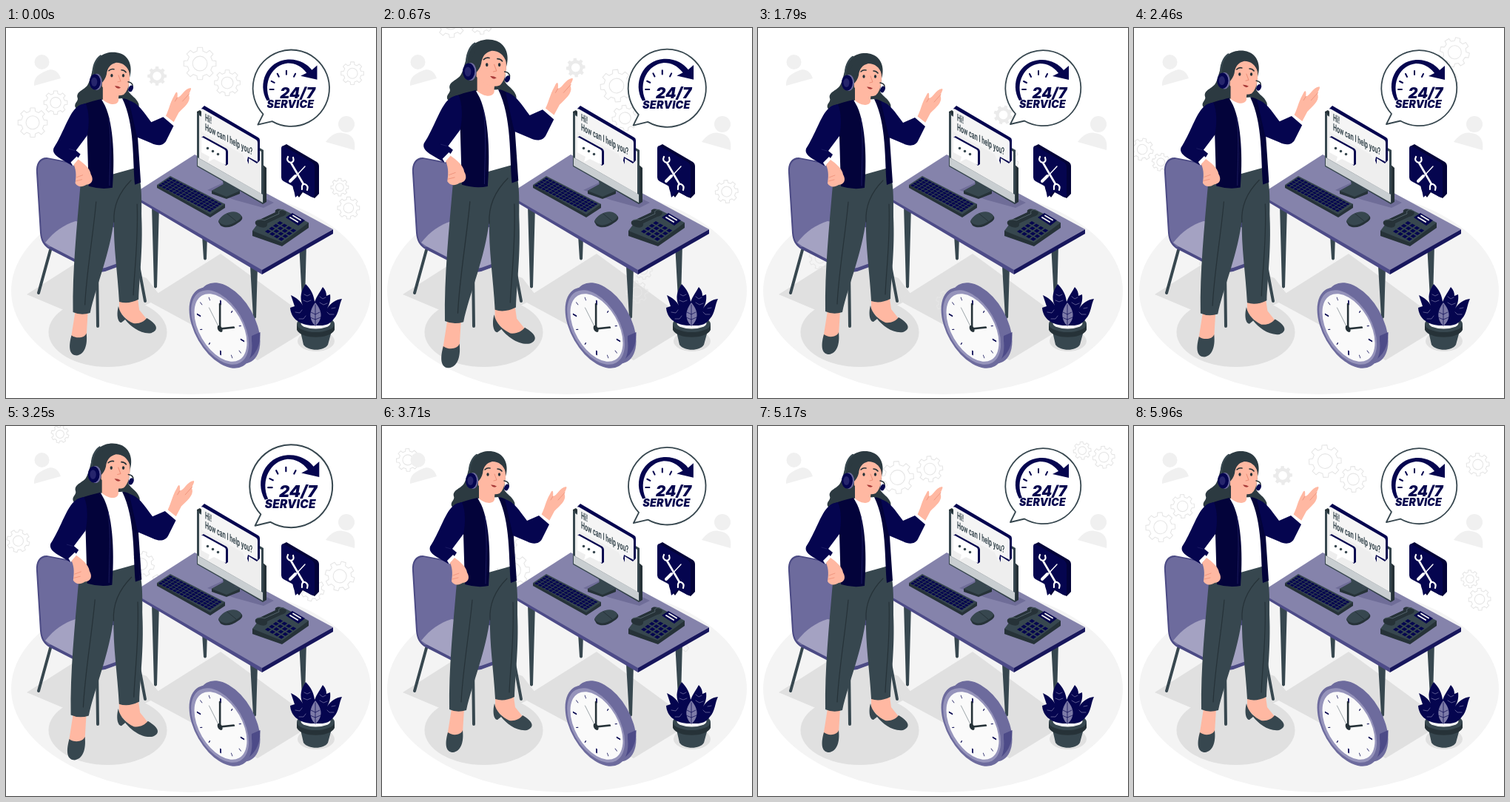
An HTML page for the animation above (6 s loop, 500 by 500 pixels).

```html
<!DOCTYPE html>
<html lang="en">
<head>
<meta charset="utf-8">
<title>24/7 service</title>
<style>
html, body { margin: 0; width: 100%; height: 100%; overflow: hidden; background: #fff; }
svg { display: block; width: 100vw; height: 100vh; }
.navy { fill: #05054f; }
.coat { fill: #03033a; }
.slate { fill: #37474f; }
.dark { fill: #263238; }
.hair { fill: #2c3a41; }
.purple { fill: #6d6b9d; }
.skin { fill: #ffb8a2; }
.white { fill: #fff; }
.line { fill: none; stroke-linecap: round; stroke-linejoin: round; }
</style>
</head>
<body>
<svg viewBox="0 0 500 500">
  <ellipse cx="250" cy="355" rx="243" ry="140" fill="#f4f4f4"/>
  <g fill="#e0e0e0">
    <path d="M28 360 L110 308 L190 338 L210 364 L130 403 Z"/>
    <path d="M190 368 L290 305 L420 400 L340 449 Z"/>
    <ellipse cx="137.500" cy="411" rx="80" ry="47"/>
    <ellipse cx="419" cy="423" rx="25" ry="14"/>
  </g>

  <g id="gears"></g>

  <g fill="#f0f0f0">
    <circle cx="48.500" cy="46" r="10"/>
    <path d="M38 78 C37 66 45 62 54 58 C64 53 71 59 74 68 Z"/>
    <circle cx="460" cy="130" r="11"/>
    <path d="M432 154 C438 146 446 140 455 142 C468 143 473 152 471 165 Z"/>
  </g>

  <g id="chair">
    <path class="line" stroke="#37474f" stroke-width="4" d="M60 300 L44 358 M123 325 L124 403 M176 305 L188 369"/>
    <path fill="#4b4a84" d="M41 196 C40 183 45 175 55 175 L92 182 C104 186 110 200 112 214 L178 292 C182 304 176 313 164 318 L134 329 C126 331 118 329 110 325 L57 298 C50 293 47 287 46 277 Z"/>
    <path class="purple" d="M43 196 C42 182 48 177 57 177 L92 184 C104 188 108 202 110 216 L120 280 L58 296 C52 291 49 287 48 277 Z"/>
    <path fill="#a4a2c2" d="M53 290 C65 275 78 266 94 261 L150 270 L172 292 C178 302 172 310 162 314 L134 324 C126 326 119 325 112 322 L60 295 Z"/>
  </g>

  <g id="desk">
    <path class="slate" d="M197 240 h10 l-3 110 q-2 3 -4 0 Z M265 280 h7 l-1 32 q-2 3 -4 0 Z M330 322 h10 l-2 69 q-2 3 -4 0 Z M396 292 h10 l-2 74 q-2 3 -4 0 Z"/>
    <path fill="#4d4b88" d="M181 224 L346 325 V333 L181 235 Z"/>
    <path fill="#17165c" d="M346 325 L442 272 V278 L346 333 Z"/>
    <path fill="#8583ab" d="M177 221 L255 171 L442 272 L346 327 L177 229 Z"/>
    <path fill="#6f6d98" d="M272 219 L300 206 L362 236 L348 243 L308 232 Z"/>
  </g>

  <g id="keyboard">
    <path class="dark" d="M204 212 V216 L276 256 L296 243 V238 Z"/>
    <path class="slate" d="M204 212 L222 200 L296 238 L276 252 Z"/>
    <g id="keys" class="navy"></g>
  </g>
  <g id="mouse">
    <path class="dark" d="M287 262 C289 256 302 246 312 250 C322 254 321 259 314 263 C305 270 296 271 290 267 Z"/>
    <path class="slate" d="M287 261 C290 253 303 246 312 249 C321 253 319 257 312 261 C303 267 296 268 290 264 Z"/>
    <path class="line" stroke="#263238" d="M299 251 L311 261"/>
  </g>

  <g id="monitor">
    <path class="dark" d="M278 220 L296 210 L316 220 V224 L298 231 L278 224 Z"/>
    <path class="slate" d="M278 220 L296 210 L316 220 L298 228 Z M292 202 L309 211 V220 C306 224 299 222 295 217 Z"/>
    <path class="dark" d="M258 113 L262 111 L352 189 L352 235 L347 238 L258 186 Z"/>
    <path class="slate" d="M258 114 L348 165 V238 L258 187 Z"/>
    <path fill="#c9ced1" d="M259 175 L347 225 V236 L259 186 Z"/>
    <path fill="#eeeeee" d="M261 118 L345 167 V224 L261 176 Z"/>
  </g>
  <g id="chat">
    <path class="navy" d="M264 109 L268 105 L341 148 Q343 149 343 152 V179 L339 183 L328 176 V184 L323 172 Z"/>
    <path fill="#f5f5f5" d="M264 111 Q264 108 267 110 L338 151 Q340 152 340 155 V181 L327 174 L325 184 L320 171 L264 140 Z"/>
    <g class="slate" font-family="Roboto, 'Open Sans', sans-serif" font-weight="700" font-size="13.500">
      <text transform="matrix(.53 .28 0 1 269 125)">Hi!</text>
      <text transform="matrix(.53 .28 0 1 269 138)">How can I help you?</text>
    </g>
    <path class="navy" d="M264 148 L267 146 L298 163 Q300 165 300 167 V184 L297 186 Z"/>
    <path class="white" d="M264 149 Q264 147 266 148 L295 164 Q297 165 297 167 V185 L281 177 L273 181 L275 174 L264 168 Z"/>
    <path class="line" stroke="#37474f" stroke-width="3.600" d="M272.500 162.500 h.01 M279.500 166.500 h.01 M286.500 170.500 h.01"/>
  </g>

  <g id="phone">
    <path class="dark" d="M333 274 V281 L373 295 L409 270 V263 Z"/>
    <path class="slate" d="M333 274 L345 258 L374 245 L409 263 L373 290 Z"/>
    <g id="buttons" class="navy"></g>
    <path class="dark" d="M341 268 C335 266 335 259 343 259 L364 249 C362 244 371 243 377 247 C381 250 378 254 372 255 L353 264 C354 270 348 271 341 268 Z"/>
    <path class="line" stroke="#53636b" d="M339 260 C343 258 347 259 349 260 L369 251 C367 246 373 244 377 247"/>
    <path class="navy" d="M378 256 L387 250 L404 260 L395 267 Z"/>
    <path class="line" stroke="#eeeeee" stroke-width="2" d="M384 256 l10 6 M388 253.500 l10 6"/>
  </g>

  <g id="tools">
    <path fill="#030338" d="M373 160 L379 157 L420 181 Q423 183 423 187 V224 L417 230 L401 222 L396 229 L389 220 Z"/>
    <path class="navy" d="M372 163 Q372 158 376 160 L413 181 Q417 184 417 188 V226 Q416 230 412 228 L400 221 L391 229 L388 214 L375 207 Q372 205 372 202 Z"/>
    <g class="line" stroke="#fff">
      <path stroke-width="2.600" d="M385 182 L402 211"/>
      <path stroke-width="2.200" d="M381 174 q-3 6 4 8 q5 -1 3 -7 M400 218 q-1 -8 4 -7 q5 2 3 8"/>
      <path stroke-width="1.400" d="M404 187 L391 201"/>
      <path stroke-width="4" d="M391 200 L384 207"/>
    </g>
  </g>

  <g id="clock">
    <g transform="matrix(.866 .5 0 1 301 399)"><circle r="49" class="purple"/></g>
    <path class="purple" d="M266 357 L277 349 L334 436 L313 457 Z"/>
    <path fill="#4d4b88" d="M332 416 L343.500 411 C344 434 334 447 314 456 C327 448 332 435 332 416 Z"/>
    <g transform="matrix(.866 .5 0 1 290 405)">
      <circle r="49" class="purple"/>
      <circle r="45" cx="-1" fill="#9694bb"/>
      <circle r="41" fill="#fafafa"/>
      <g id="ticks" stroke="#05054f"></g>
      <path class="line" stroke="#8a949a" stroke-width=".8" d="M0 4 L-18 -18"/>
      <path class="line" stroke="#263238" stroke-width="3" d="M-1 2 L-1 -31"/>
      <path class="line" stroke="#263238" stroke-width="2.400" d="M-1 2 L21 -11"/>
      <circle cx="-1" cy="2" r="4" class="dark"/>
    </g>
  </g>

  <g id="plant">
    <path class="slate" d="M397 406 L402 428 C408 437 430 437 435 428 L441 406 Z"/>
    <path class="dark" d="M393 400 V408 C399 421 438 421 444 408 V400 Z"/>
    <ellipse cx="418.500" cy="400" rx="25.500" ry="11" class="slate"/>
    <ellipse cx="418.500" cy="399" rx="20" ry="7.500" fill="#f5f5f5"/>
    <path class="navy" d="M412 402 C394 400 385 391 384 378 L390 376 L385 361 C393 365 398 369 401 375 C396 364 399 355 405 346 C412 353 416 361 417 370 C420 362 425 356 428 350 C432 354 433 358 433 362 L438 360 C439 368 437 374 434 379 C439 371 446 367 454 366 C450 374 450 386 443 393 C438 400 432 402 425 402 Z"/>
    <path fill="#7d7ba8" d="M418 403 C408 392 410 382 418 371 C427 382 429 392 418 403 Z"/>
    <path class="line" stroke="#6d6b9d" stroke-width=".8" d="M403 360 l4 2 4 -2 M402 368 l5 2 5 -2 M391 384 l6 1 3 -4 M396 393 l6 0 3 -4 M424 363 l4 3 4 -2 M424 371 l5 3 5 -2 M445 378 l-5 1 M443 387 l-6 0 -3 -3"/>
    <path class="line" stroke="#05054f" stroke-width=".7" d="M418 374 V402 M412 384 l6 3 6 -3 M411 391 l7 3 7 -3"/>
  </g>

  <g id="bubble">
    <path d="M348 116 A51 51 0 1 1 360 125.500 L341 130 Z" fill="#fff" stroke="#37474f" stroke-width="1.800" stroke-linejoin="round"/>
    <path class="navy" d="M353 98 C340 75 353 45 381 43 C395 42 407 49 413 57 L420 51 L420 70 L398 65 L406 61 C399 52 391 48 381 48 C360 50 347 74 357 97 Z"/>
    <path class="line" stroke="#05054f" stroke-width="2" d="M357 83 h5 M359 72 l4 2 M367 62 l2 4 M379 58 v5 M391 62 l-2 4"/>
    <g class="navy" font-family="Inter, 'Open Sans', sans-serif" font-weight="900" font-style="italic">
      <text x="370.500" y="94.500" font-size="20">24/7</text>
      <text x="353" y="108" font-size="14" letter-spacing=".2">SERVICE</text>
    </g>
  </g>

  <g id="woman">
    <path class="hair" d="M118 56 C120 38 140 30 155 36 C168 41 171 56 167 68 L165 86 C170 94 175 94 179 103 C182 112 172 116 163 111 L120 108 C110 115 98 115 94 108 C92 102 99 100 97 95 C95 87 105 85 110 79 C114 73 115 65 118 56 Z"/>
    <g id="feet">
      <path class="skin" d="M94 382 H111 L109 415 L100 424 L88 420 Z M153 366 H178 L180 380 L192 395 L182 402 L166 396 L153 382 Z"/>
      <path class="slate" d="M89 414 C84 432 87 441 96 441 C106 440 111 428 109 411 C107 418 95 419 89 414 Z M152 375 C149 386 151 397 156 397 L161 393 C168 402 182 413 196 411 C207 407 204 399 190 391 C186 396 180 399 172 398 C163 394 154 386 152 375 Z"/>
    </g>
    <path class="slate" d="M108 208 L176 189 C184 206 183 232 183 255 C185 300 180 335 179 366 Q165 373 153 369 C151 330 145 295 146 258 C141 304 121 350 114 384 Q102 388 91 383 C90 328 96 270 101 212 Z"/>
    <path class="line" stroke="#263238" stroke-width="1.200" d="M146 262 C145 245 150 225 169 206 M107 373 C109 330 118 280 122 235 M172 360 C173 330 179 286 177 238"/>
    <path class="white" d="M128 98 L158 96 C169 108 172 125 173 145 L171 189 C163 193 152 193 143 190 L140 125 Z"/>
    <path class="skin" d="M131 78 L153 86 L152 96 C154 104 143 108 131 98 Z"/>
    <g id="rightArm">
      <path class="skin" d="M213 124 C220 113 220 104 227 92 C230 85 232 87 231 95 C237 94 240 83 249 82 C251 84 245 90 247 93 C249 101 240 108 233 115 L225 130 Z"/>
      <path class="line" stroke="#ec8f78" stroke-width=".8" d="M247 90 L238 100 M231 95 l-3 5"/>
      <path class="white" d="M211 122 L215 119 L229 130 L225 135 Z"/>
      <path class="coat" d="M157 96 C167 97 173 102 177 112 L178 150 L182 209 L174 212 C171 180 174 130 157 96 Z"/>
      <path class="navy" d="M166 99 C178 102 184 112 196 128 L212 121 L226 133 L216 153 C212 160 204 160 196 156 L177 148 Z"/>
    </g>
    <path class="coat" d="M129 97 C117 100 109 102 102 105 L110 146 L112 214 Q129 219 144 216 C147 180 146 132 134 106 Z"/>
    <path class="navy" d="M108 103 C101 104 98 106 95 109 C85 118 77 145 65 163 C63 169 68 173 74 177 L91 187 L101 171 L95 166 L110 146 C113 132 113 114 108 103 Z"/>
    <path class="line" stroke="#26256c" stroke-width=".7" d="M139 122 C143 150 140 190 140 213 M93 166 l-7 -2"/>
    <path class="white" d="M88 182 L96 174 L99 177 L91 187 Z"/>
    <path class="skin" d="M92 185 L98 178 C105 183 114 190 115 198 C119 205 117 211 109 212 C103 216 97 215 94 210 C95 202 96 194 92 185 Z"/>
    <path class="line" stroke="#ec8f78" stroke-width=".8" d="M96 202 l8 -3 M95 207 l8 -2"/>
    <g id="head">
      <path class="skin" d="M130 66 C130 44 155 42 165 53 C169 67 167 84 159 91 C149 95 136 88 130 80 Z"/>
      <path class="hair" d="M125 74 C121 50 134 37 149 37 C161 37 169 46 167 62 C164 53 158 48 149 48 C141 50 137 55 136 64 C135 69 132 73 129 76 Z"/>
      <path class="line" stroke="#263238" stroke-width="1.600" d="M139 59 q3 -3 7 -2 M156 58 q4 0 6 3"/>
      <ellipse cx="143" cy="65.500" rx="1.600" ry="2.200" class="dark"/>
      <ellipse cx="158.500" cy="65.500" rx="1.600" ry="2.200" class="dark"/>
      <path class="line" stroke="#ec8f78" d="M152 65 l3 8 -4 1"/>
      <path fill="#a83b39" d="M147 79.500 Q151 79 155 81.500 Q151 85 147 79.500 Z"/>
      <path class="line" stroke="#37474f" stroke-width="2.400" d="M118 66 C117 53 122 43 128 39"/>
      <ellipse cx="123" cy="74" rx="7" ry="11" fill="#6d6b9d"/>
      <ellipse cx="120.500" cy="74" rx="7.500" ry="10.500" class="navy"/>
      <ellipse cx="119.500" cy="74" rx="4" ry="6" fill="#26256c"/>
      <path class="line" stroke="#263238" stroke-width="1.500" d="M165 74 Q172 75 171 81"/>
      <ellipse cx="168.500" cy="83" rx="3" ry="4.500" transform="rotate(25 168.500 83)" class="navy"/>
    </g>
  </g>
</svg>
<script>
const LOOP = 6000;
const BEAT_LEAD = 40;
const byId = id => document.getElementById(id);
const range = n => [...Array(n).keys()];

// Toothed outline around the origin
function cog(r, teeth = 8) {
  const step = 2 * Math.PI / teeth;
  const corners = [[-.3, .78], [-.2, 1], [.2, 1], [.3, .78]];
  return 'M' + range(teeth).flatMap(i => corners.map(([a, k]) => {
    const angle = (i + a) * step;
    return (r * k * Math.cos(angle)).toFixed(2) + ' ' + (r * k * Math.sin(angle)).toFixed(2);
  })).join('L') + 'Z';
}

function ring(r) {
  return `M${r} 0A${r} ${r} 0 1 0 ${-r} 0A${r} ${r} 0 1 0 ${r} 0Z`;
}

function gear([x, y, r, solid]) {
  const paint = solid
    ? 'fill="#ebebeb" fill-rule="evenodd"'
    : 'fill="none" stroke="#e6e6e6" stroke-width="1.1" stroke-linejoin="round"';
  return `<path transform="translate(${x} ${y})" ${paint} d="${cog(r)}${ring(r * .45)}"/>`;
}

// Rows of small tiles on a slanted plane
function tiles(cols, rows, origin, across, down, fill) {
  return range(cols * rows).map(n => {
    const c = n % cols, r = Math.floor(n / cols);
    const x = origin[0] + across[0] * c + down[0] * r;
    const y = origin[1] + across[1] * c + down[1] * r;
    const [ax, ay] = across.map(v => v * fill);
    const [dx, dy] = down.map(v => v * fill);
    return `<path d="M${x} ${y}l${ax} ${ay} ${dx} ${dy} ${-ax} ${-ay}Z"/>`;
  }).join('');
}

byId('gears').innerHTML = [
  [36, 128, 20], [67, 101, 16], [204, 65, 13, true], [262, 48, 22],
  [299, 74, 17.5], [468, 61, 15.5], [451, 215, 12], [463, 243, 15]
].map(gear).join('');

byId('keys').innerHTML = tiles(15, 5, [222, 202], [4.7, 2.42], [-3.35, 2.25], .8);
byId('buttons').innerHTML = tiles(4, 4, [370, 261], [6, 3.4], [-5.4, 3.8], .7);
byId('ticks').innerHTML = range(12).map(i =>
  `<path transform="rotate(${i * 30})" stroke-width="${i % 3 ? 1 : 2}" d="M0 -37V${i % 3 ? -33 : -31}"/>`).join('');

const BEAT = [[0, 1], [.1, 1.1], [.3, 1], [.4, 1], [.5, 1.1], [.6, 1], [1, 1]];

function beat(time, period) {
  const phase = (time + BEAT_LEAD) % period / period;
  const i = BEAT.findIndex(([p]) => p > phase);
  const [p0, s0] = BEAT[i - 1], [p1, s1] = BEAT[i];
  return s0 + (s1 - s0) * (phase - p0) / (p1 - p0);
}

function scaleAbout(id, x, y, s) {
  byId(id).setAttribute('transform', `translate(${x} ${y}) scale(${s}) translate(${-x} ${-y})`);
}

function draw(time) {
  byId('gears').setAttribute('transform', `rotate(${360 * (time % LOOP) / LOOP} 248.5 138)`);
  scaleAbout('woman', 157, 239, beat(time, LOOP));
  scaleAbout('bubble', 386, 81, beat(time, LOOP / 2));
}

const start = performance.now();
function tick() {
  draw(performance.now() - start);
  requestAnimationFrame(tick);
}
draw(0);
requestAnimationFrame(tick);
</script>
</body>
</html>
```
